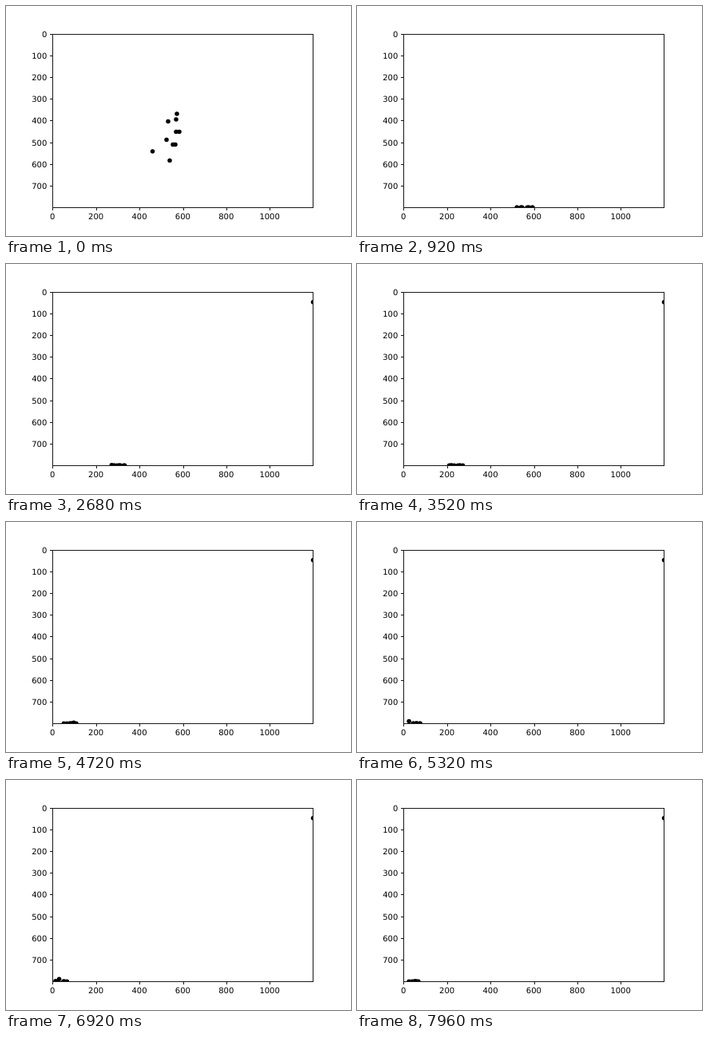
Recreate the animation shown at these times as an HTML page with a canvas. Size 432 px wide and 288 px high, loop 8 s.

```html
<!DOCTYPE html>
<html>
<head>
<meta charset="utf-8">
<style>
html, body { margin: 0; width: 100%; height: 100%; overflow: hidden; background: #fff; }
canvas { display: block; }
</style>
</head>
<body>
<canvas id="stage" width="432" height="288"></canvas>
<script>
const ctx = document.getElementById('stage').getContext('2d');
const LOOP = 8000, STEP = 40, LANDED = 880;
const LEFT = 58.5, TOP = 35.5, RIGHT = 384.5, BOTTOM = 252.5;
const FLOOR = 252.2, SCALE = 0.2718;

// Starting swarm; the last dot later leaves for the right edge.
const start = [[183.5, 182], [201, 167.5], [203, 144.5], [205, 193.5], [209, 173.5],
  [212, 173.5], [213, 142], [213, 157.5], [214, 135], [217, 157.5]];

// Centre of the swarm on the floor: [time, x]
const path = [[0, 210], [920, 210], [1760, 161], [3520, 124], [4160, 74], [4720, 82], [6000, 66], [8000, 73]];

function random(seed) {
  const s = Math.sin(seed * 127.1 + 3.7) * 43758.5453;
  return s - Math.floor(s);
}

function centre(t) {
  const k = path.findIndex(p => p[0] > t);
  const [t0, x0] = path[k - 1], [t1, x1] = path[k];
  return x0 + (x1 - x0) * (t - t0) / (t1 - t0);
}

// Dots fall from the start, then drift along the floor, mixing and hopping.
function swarmDot(i, t) {
  const [x, y] = start[i];
  const phase = 2 * Math.PI * random(i);
  const fall = Math.min(1, t / (LANDED - 200 * random(i + 20))) ** 1.4;
  const width = 22 - t / 800;
  const place = (i / (start.length - 1) - 0.5) * width + 2 * Math.sin(t / 500 + phase);
  const hop = 3 * Math.max(0, Math.sin(t / 400 + phase)) ** 60;
  dot(x + (centre(t) + place - x) * fall, y + (FLOOR - hop - y) * fall);
}

function dot(x, y) {
  ctx.beginPath();
  ctx.arc(x, y, 2.75, 0, 7);
  ctx.fill();
}

function line(x0, y0, x1, y1) {
  ctx.beginPath();
  ctx.moveTo(x0, y0);
  ctx.lineTo(x1, y1);
  ctx.stroke();
}

function drawAxes() {
  ctx.strokeStyle = '#181818';
  ctx.lineWidth = 1;
  ctx.font = '10px "DejaVu Sans", sans-serif';
  ctx.textRendering = 'geometricPrecision';
  ctx.strokeRect(LEFT, TOP, RIGHT - LEFT, BOTTOM - TOP);
  ctx.textAlign = 'center';
  for (let v = 0; v <= 1000; v += 200) {
    const x = Math.floor(58.95 + v * SCALE) + 0.5;
    line(x, BOTTOM, x, BOTTOM + 3.5);
    ctx.fillText(v, 58.3 + v * SCALE, 267);
  }
  ctx.textAlign = 'right';
  for (let v = 0; v <= 700; v += 100) {
    const y = Math.floor(35.15 + v * SCALE) + 0.5;
    line(LEFT - 3.5, y, LEFT, y);
    ctx.fillText(v, 51.3, y + 3.5);
  }
}

function draw(now) {
  const t = Math.floor(now % LOOP / STEP) * STEP;
  const last = start.length - 1;
  ctx.fillStyle = '#fff';
  ctx.fillRect(0, 0, 432, 288);
  ctx.fillStyle = '#000';
  ctx.save();
  ctx.beginPath();
  ctx.rect(LEFT, TOP, RIGHT - LEFT, BOTTOM - TOP);
  ctx.clip();
  for (let i = 0; i < last; i++) swarmDot(i, t);
  if (t < 960) swarmDot(last, t);
  else dot(RIGHT, 47.8);
  ctx.restore();
  drawAxes();
}

const began = performance.now();
function tick() {
  draw(performance.now() - began);
  requestAnimationFrame(tick);
}
tick();
</script>
</body>
</html>
```
